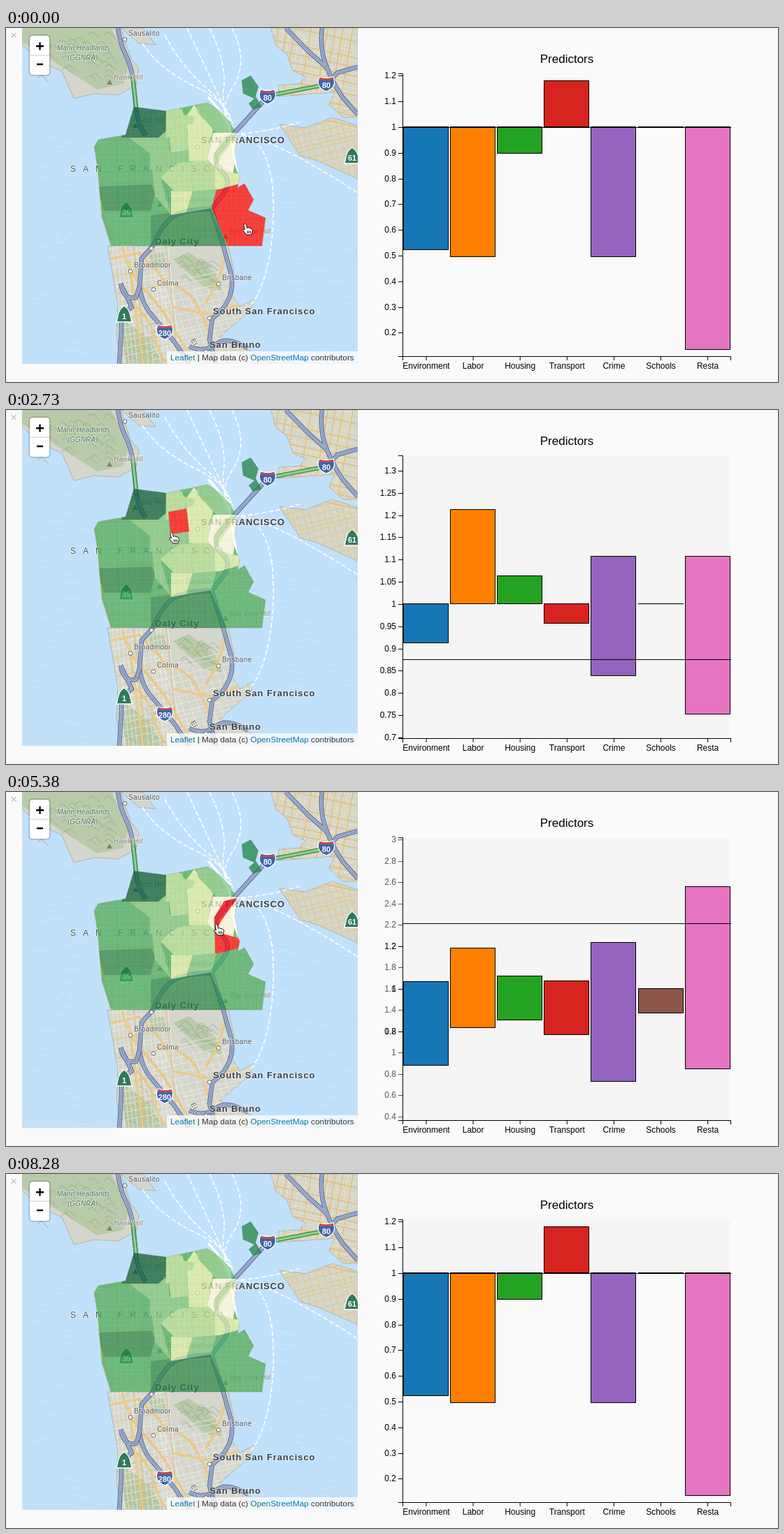
Animation of 1104 by 507 pixels, one loop 8.91 s. Source, as an HTML page:

```html
<!DOCTYPE html>
<html lang="en">
<head>
<meta charset="utf-8">
<title>Predictors</title>
<style>
html, body { margin: 0; width: 100%; height: 100%; overflow: hidden; background: #fafafa; }
svg { display: block; width: 1104px; height: 507px; font-family: "Liberation Sans", Arial, sans-serif; }
.axis { fill: none; stroke: #000; }
.tick { font-size: 12px; text-anchor: end; }
.shield { font-size: 11px; font-weight: 700; fill: #fff; text-anchor: middle; }
.place { font-size: 10px; letter-spacing: .4px; fill: #50565a; paint-order: stroke; stroke: #fff; stroke-opacity: .45; stroke-width: 2px; }
.city { font-size: 13px; font-weight: 700; letter-spacing: .9px; fill: #3c4146; }
.hill, .park { font-style: italic; letter-spacing: 0; fill: #85867e; }
.park { fill: #4d7862; }
.wide { font-size: 12px; letter-spacing: 10px; }
</style>
</head>
<body>
<svg id="stage" viewBox="0 0 1104 507">
  <defs>
    <clipPath id="frame"><rect x="23" width="480" height="481"/></clipPath>
    <clipPath id="shore"/>
    <clipPath id="limits"/>
  </defs>
  <text x="11" y="16" font-size="17" fill="#bbb" text-anchor="middle">×</text>
  <g clip-path="url(#frame)">
    <rect x="23" width="480" height="481" fill="#c1e0fa"/>
    <g id="land"/><g id="streets" clip-path="url(#shore)"/><g id="ferries"/><g id="roads"/><g id="labels"/>
    <path d="M337 75L350 68 361 84 357 98 366 113 353 117 347 108 355 101 339 94Z" fill="#238443" opacity=".75"/>
    <g opacity=".7"><g id="areas" clip-path="url(#limits)"/></g>
  </g>
  <rect x="32.500" y="9.500" width="31" height="59" rx="5" opacity=".2"/>
  <rect x="34" y="11" width="28" height="56" rx="4" fill="#fff"/>
  <path d="M34 39H62" stroke="#ccc"/>
  <path d="M43 26H54M48.500 20.500V31.500M44 52H53" stroke="#000" stroke-width="2.300"/>
  <rect x="230" y="463" width="273" height="18" fill="#fff" fill-opacity=".75"/>
  <text x="235" y="476" font-size="11.800" fill="#333"><tspan fill="#0078a8">Leaflet</tspan> | Map data (c) <tspan fill="#0078a8">OpenStreetMap</tspan> contributors</text>
  <rect id="plot" x="568" y="65" width="468" height="405" fill="#f5f5f5"/>
  <text x="802" y="50" font-size="17" text-anchor="middle">Predictors</text>
  <g id="bars"/>
  <path id="rule" class="axis" d="M568 0H1037"/>
  <g id="ticks"/>
  <path class="axis" d="M561 65.500H567.500V470.500H561M567.500 476V470.500H1036.500V476"/>
  <g id="names"/>
  <path id="hand" d="M-5-7C-4.500-9-2-9-1.500-7L-.5-2.500C1-4 3-3 3-2 4.500-3 6-2 6-.8 7-1.500 8 0 7.500 2L6 7H-1L-6 1C-7-1-5-2-3.500 0ZM.5 1.500V5M2.500 1.500V5M4.500 1.500V5" fill="#fff" stroke="#111"/>
</svg>
<script>
const LOOP = 8910;
const $ = id => document.getElementById(id);

function add(parent, tag, attrs, text) {
  const el = document.createElementNS('http://www.w3.org/2000/svg', tag);
  for (const k in attrs) el.setAttribute(k, attrs[k]);
  if (text !== undefined) el.textContent = text;
  $(parent).append(el);
  return el;
}
const line = (parent, d, stroke, width, extra) =>
  add(parent, 'path', { d, fill: 'none', stroke, 'stroke-width': width, 'stroke-linejoin': 'round', ...extra });

let seed = 7;
const rand = () => (seed = seed * 16807 % 2147483647) / 2147483647;
const mix = (a, b, p) => a + (b - a) * p;
const clamp = v => Math.max(0, Math.min(1, v));

// Land
const city = 'M126 170L132 160 171 153 183 113 229 119 288 107 305 118 321 135 331 154 325 190 334 214 331 229 341 223 354 246 346 261 371 272 366 312H150L137 270 131 200Z';
const shores = [
  'M23 0H164L178 42 190 58 186 82 160 96 126 94 97 101 80 62 50 48 23 24Z',
  'M165 0H196L214 24 190 22Z',
  'M379 0H503V128H482L462 110 470 92 390 98V82L420 80 428 70 410 61 402 38 386 25Z',
  'M391 138L428 143 467 128 503 140V216L445 190 421 183Z',
  city,
  'M145 312H318L326 350 323 382 334 399 354 389 350 404 306 442 349 462 384 481H165L158 441 160 396Z'
];
for (const d of shores) {
  add('land', 'path', { d, fill: '#d5d6cc', stroke: '#a3aaa6', 'stroke-width': .8 });
  add('shore', 'path', { d });
}
add('limits', 'path', { d: city });
for (const d of [
  'M23 0H150L176 50 168 80 130 88 84 58 23 20Z',
  'M239 331L262 321 299 350 309 376 284 372Z',
  'M160 412L206 446 224 481H172Z',
  'M200 318L225 322 230 342 211 346Z'
]) add('land', 'path', { d, fill: '#b9caa9' });

// Scattered strokes: hills on land, ripples on water
function scatter(n, x, y, w, h, shape, color) {
  for (let i = 0; i < n; i++)
    line('land', `M${x + rand() * w} ${y + rand() * h}${shape}`, color, 1.2, { opacity: .55 });
}
const hill = 'q5-7 9-2t7 6', ripple = 'q4-3 9 0t9-1';
scatter(34, 45, 6, 105, 72, hill, '#93a985');
scatter(20, 245, 330, 45, 34, hill, '#93a985');
scatter(25, 165, 425, 45, 50, hill, '#a5b296');
scatter(22, 25, 105, 80, 370, ripple, '#b0d3f1');
scatter(25, 385, 220, 100, 250, ripple, '#b0d3f1');

// Street grids
function grid(x, y, w, h, gap, lean, color, width) {
  let d = '';
  const next = () => gap * (.6 + rand() * .8);
  for (let a = 0; a < w; a += next()) d += `M${x + a} ${y}l${lean} ${h}`;
  for (let b = 0; b < h; b += next()) d += `M${x} ${y + b}l${w} ${-lean}`;
  line('streets', d, color, width, { opacity: .75 });
}
grid(126, 110, 245, 202, 7, 5, '#f8f3dc', 1);
grid(126, 110, 245, 202, 24, 5, '#e9c671', 1.2);
grid(375, -30, 128, 160, 7, -28, '#f2e3b6', 1);
grid(375, -30, 128, 160, 17, -28, '#e3b255', 1.3);
grid(385, 130, 118, 100, 9, 28, '#e9c371', 1.1);
grid(143, 312, 90, 170, 9, 18, '#f0eee2', 1);
grid(210, 370, 170, 112, 9, 38, '#f0eee2', 1);
grid(143, 312, 90, 170, 36, 18, '#e5b765', 1.2);
const avenues = 'M166 312Q175 350 196 372T230 415 262 468M150 330L190 322 218 350 232 372M215 365Q258 365 276 402T300 470M240 400L292 410 335 396M180 395Q205 410 215 450T250 481M314 320Q308 360 285 394M176 335L196 481';
line('streets', avenues, '#e9b45a', 2.6);
line('streets', avenues, '#fbe3a4', 1);
line('streets', 'M132 195Q134 250 142 280L150 312', '#f2c795', 4);

// Ferry lanes fan out of the terminal
const ferry = d => line('ferries', d, '#fff', 1.6, { 'stroke-dasharray': '7 3' });
for (let i = 0; i < 5; i++) {
  const x = 195 + 32 * i;
  ferry(`M${x} ${i < 2 ? 22 - 12 * i : 0}Q${x + 25} ${60 - 3 * i} ${mix(x, 325, .6)} 85T325 150`);
}
for (const end of ['420 135', '503 236', '380 220']) ferry(`M326 152Q370 150 ${end}`);
ferry('M380 215Q386 275 377 325T350 397');
line('ferries', 'M289 99Q315 126 322 152L326 185 331 212', '#fff', 3.5);

// Motorways and bridges
for (const d of [
  'M160 0Q163 22 171 38T182 76L186 116Q189 140 200 154',
  'M375 97L326 151 301 181Q297 195 310 207T312 236L294 259Q250 260 236 272T210 312L194 330 191 370Q194 396 211 414L242 451 262 481',
  'M294 259L309 306 319 342Q327 365 320 384T295 416L291 446 300 481',
  'M164 366Q168 390 186 386L191 370M164 366L180 400Q163 408 165 432L162 481',
  'M262 456Q284 466 300 453T346 459',
  'M452 0Q448 30 459 57T482 100L503 124M459 80L474 64 503 56M459 57L432 33 400 0'
]) {
  line('roads', d, '#63749f', 6.5);
  line('roads', d, '#a6b4d4', 4);
  line('roads', d, '#6e80ac', .8);
}
const bridges = 'M181 68L186 114M375 97L458 81';
line('roads', bridges, '#4a8f50', 6);
line('roads', bridges, '#8ed389', 3);

function shield(x, y, n, shape, color) {
  add('roads', 'path', { d: shape, transform: `translate(${x} ${y})`, fill: color, stroke: '#fff', 'stroke-width': 1.3 });
  add('roads', 'text', { class: 'shield', x, y: y + 6 }, n);
}
const freeway = 'M-10-10Q0-7 10-10 16 5 0 11-16 5-10-10', state = 'M0-13Q6-9 8-3L11 10H-11L-8-3Q-6-9 0-13';
for (const [x, y, n] of [[374, 98, 80], [458, 80, 80], [227, 435, 280]]) {
  shield(x, y, n, freeway, '#3e64ab');
  add('roads', 'path', { d: `M${x - 9} ${y - 9}q9 3 18 0l1 4h-20z`, fill: '#c64b4b' });
}
for (const [x, y, n] of [[169, 411, 1], [172, 262, 35], [495, 184, 61]]) shield(x, y, n, state, '#2f7a5c');

// Place names, each kind with its own marker
for (const [x, y, kind, text] of [
  [279, 165, 'city', 'SAN FRANCISCO'], [213, 310, 'city', 'Daly City'],
  [296, 410, 'city', 'South San Francisco'], [291, 458, 'city', 'San Bruno'],
  [175, 11, 'town', 'Sausalito'], [183, 343, 'town', 'Broadmoor'],
  [216, 369, 'town', 'Colma'], [309, 361, 'town', 'Brisbane'],
  [226, 249, 'hill', 'Mount Davidson'], [320, 295, 'hill', 'Bay View Hill'],
  [154, 74, 'hill', 'Hawk Hill'], [191, 136, 'hill', 'Rob Hill'],
  [73, 32, 'park', 'Marin Headlands'], [88, 46, 'park', '(GGNRA)'],
  [92, 206, 'wide', 'SAN FRANCISCO']
]) {
  add('labels', 'text', { class: 'place ' + kind, x, y }, text);
  if (kind === 'hill') add('labels', 'path', { d: `M${x - 10} ${y + 7}l4-7 4 7z`, fill: '#85806b' });
  if (kind === 'city' || kind === 'town')
    add('labels', 'circle', { cx: x - 5, cy: y + 5.5, r: 2.8, fill: '#fff', stroke: '#666' });
}
add('labels', 'text', { class: 'place', transform: 'translate(264 447) rotate(62)' }, 'El C');

// Districts overlap, later ones cover earlier ones; the coast trims them
const greens = ['#ffffe5', '#d9f0a3', '#addd8e', '#78c679', '#41ab5d', '#238443', '#005a32'];
add('areas', 'path', { d: city, fill: greens[4] });
const districts = [
  [3, '172,150 232,150 234,180 206,204 206,180 180,160'],
  [5, '130,227 208,224 213,235 207,262 140,262'],
  [5, '207,268 292,258 316,312 207,312'],
  [6, '165,157 183,108 229,118 228,148 218,157'],
  [3, '206,178 262,174 263,192 221,214 236,267 213,240'],
  [2, '229,146 266,137 262,145 228,158'],
  [1, '236,233 267,234 258,264 236,268'],
  [2, '263,192 296,186 302,231 267,234'],
  [3, '267,234 301,231 294,258 258,264'],
  [1, '258,126 269,110 296,145 288,190 262,191'],
  [3, '271,105 322,110 322,150 301,150 275,122'],
  [0, '296,150 332,150 325,208 300,200 288,188'],
  [2, '229,119 237,113 252,117 254,124 271,128 267,137 229,146'],
  [2, '232,146 258,141 262,174 236,178'],
  [2, '221,214 236,200 248,193 263,192 267,234 241,234'],
  [1, '298,179 312,156 331,152 308,184 300,200 335,210 335,231 299,231'],
  [4, '294,258 301,232 345,220 400,270 366,320 317,312']
].map(([shade, points]) => ({ fill: greens[shade], el: add('areas', 'polygon', { points }) }));

// Pointer stops: time, x, y
const stops = [
  [230, 345, 289], [1060, 270, 250], [1360, 270, 250], [1680, 262, 242], [2210, 222, 207], [2730, 240, 184],
  [3260, 190, 155], [4100, 205, 138], [4510, 272, 138], [5380, 304, 198], [6270, 319, 257], [6770, 319, 257],
  [7220, 400, 304], [7400, 400, 304], [7580, 723, 424], [7850, 723, 424], [8050, 985, 505]
];

function segment(list, t, time) {
  const n = list.findIndex(k => time(k) > t);
  if (n === 0) return [list[0], list[0], 0];
  if (n < 0) return [list.at(-1), list.at(-1), 0];
  const a = list[n - 1], b = list[n];
  return [a, b, (t - time(a)) / (time(b) - time(a))];
}

// Each bar runs from its start value (usually 1) to its end value; the extent fills the span
function pose(t, rule, ends, starts = {}, span = [75, 460]) {
  const from = ends.map((_, i) => starts[i] || 1);
  const all = [...ends, ...from], max = Math.max(...all);
  const unit = (span[1] - span[0]) / (max - Math.min(...all));
  const y = v => span[0] + (max - v) * unit;
  const bars = ends.map((v, i) => [y(Math.max(v, from[i])), y(Math.min(v, from[i]))]);
  const range = 405 / unit;
  return { t, rule, bars, unit, one: y(1), step: range > 1.2 ? .2 : range > .8 ? .1 : .05 };
}
const rest = [.524, .495, .898, 1.182, .497, 1, .136];
const poses = [
  pose(230, 142, rest),
  pose(1680, 250, [.5565, 1.177, .984, .972, 1.148, 1, .8935]),
  pose(2730, 357, [.912, 1.212, 1.063, .957, .84, 1, .752], { 4: 1.108, 6: 1.108 }, [143, 436]),
  pose(4510, 247, [.938, 1.356, .837, .98, .126, 1, .22], { 0: 1.165, 2: 1.033, 3: 1.155 }),
  pose(5380, 188, [.637, .818, .852, .782, .563, .885, .624],
    { 0: 1.036, 1: 1.193, 2: 1.06, 3: 1.036, 4: 1.218, 6: 1.484 }, [135.5, 414.5]),
  pose(6430, 142, rest)
];
// The wide scale that starts to fade in when values exceed 2
const fresh = { t: 5380, one: 373, unit: 152.5, step: .2 };

const bars = ['#1776b6', '#ff7f00', '#24a222', '#d8241f', '#9564bf', '#8d5649', '#e574c3']
  .map((fill, i) => add('bars', 'rect', { x: Math.round(568 + 67.1 * i) + .5, width: 64, fill, stroke: '#000' }));
['Environment', 'Labor', 'Housing', 'Transport', 'Crime', 'Schools', 'Resta'].forEach((name, i) => {
  const x = 601 + 67.1 * i;
  add('names', 'path', { d: `M${x} 470v6`, stroke: '#000' });
  add('names', 'text', { x, y: 488, 'font-size': 12, 'text-anchor': 'middle' }, name);
});

function collect(shown, { one, unit, step }, weight) {
  const low = 1 - (470 - one) / unit, high = 1 + (one - 65) / unit;
  for (let n = Math.ceil(low / step); n * step <= high; n++) {
    const key = (n * step).toFixed(2);
    shown[key] = (shown[key] || 0) + weight;
  }
}

function drawTicks(shown, one, unit) {
  for (const v in shown) {
    const y = one - (v - 1) * unit, opacity = shown[v];
    if (y < 65 || y > 505 || opacity < .03) continue;
    add('ticks', 'text', { class: 'tick', x: 558, y: y + 4, opacity }, String(+v));
    add('ticks', 'path', { d: `M561 ${Math.round(y) + .5}h6`, stroke: '#000', opacity });
  }
}

function drawChart(t) {
  const [a, b, raw] = segment(poses, t, k => k.t);
  const p = 1 - (1 - raw) ** 1.6;
  bars.forEach((bar, i) => {
    const [top, end] = [0, 1].map(k => Math.round(mix(a.bars[i][k], b.bars[i][k], p) - .5) + .5);
    bar.setAttribute('y', top);
    bar.setAttribute('height', Math.max(.1, end - top));
  });
  $('rule').setAttribute('transform', `translate(0 ${Math.round(mix(a.rule, b.rule, p)) + .5})`);

  $('ticks').replaceChildren();
  const shown = {}, late = {};
  const arriving = clamp(1 - Math.abs(t - fresh.t) / 350);
  collect(shown, a, 1 - p);
  collect(shown, b, p);
  for (const v in shown) if (Math.abs(v - 1) > .21) shown[v] *= 1 - arriving;
  collect(late, fresh, .65 * arriving);
  drawTicks(shown, mix(a.one, b.one, p), mix(a.unit, b.unit, p));
  drawTicks(late, fresh.one, fresh.unit);
  $('plot').setAttribute('height', t < 6430 ? 405 : 77);
  $('plot').setAttribute('opacity', t < 230 ? 0 : 1);
}

function drawMap(t) {
  const [a, b, p] = segment(stops, t, k => k[0]);
  const x = mix(a[1], b[1], p), y = mix(a[2], b[2], p);
  const tip = $('stage').createSVGPoint();
  tip.x = x - 3;
  tip.y = y - 9;
  const hot = districts.findLast(d => d.el.isPointInFill(tip));
  for (const d of districts) d.el.setAttribute('fill', d === hot ? '#ff0000' : d.fill);
  $('hand').setAttribute('transform', `translate(${x} ${y})`);
  $('hand').setAttribute('visibility', t < 8280 ? 'visible' : 'hidden');
}

function frame() {
  const t = performance.now() % LOOP;
  drawMap(t);
  drawChart(t);
  requestAnimationFrame(frame);
}
frame();
</script>
</body>
</html>
```
